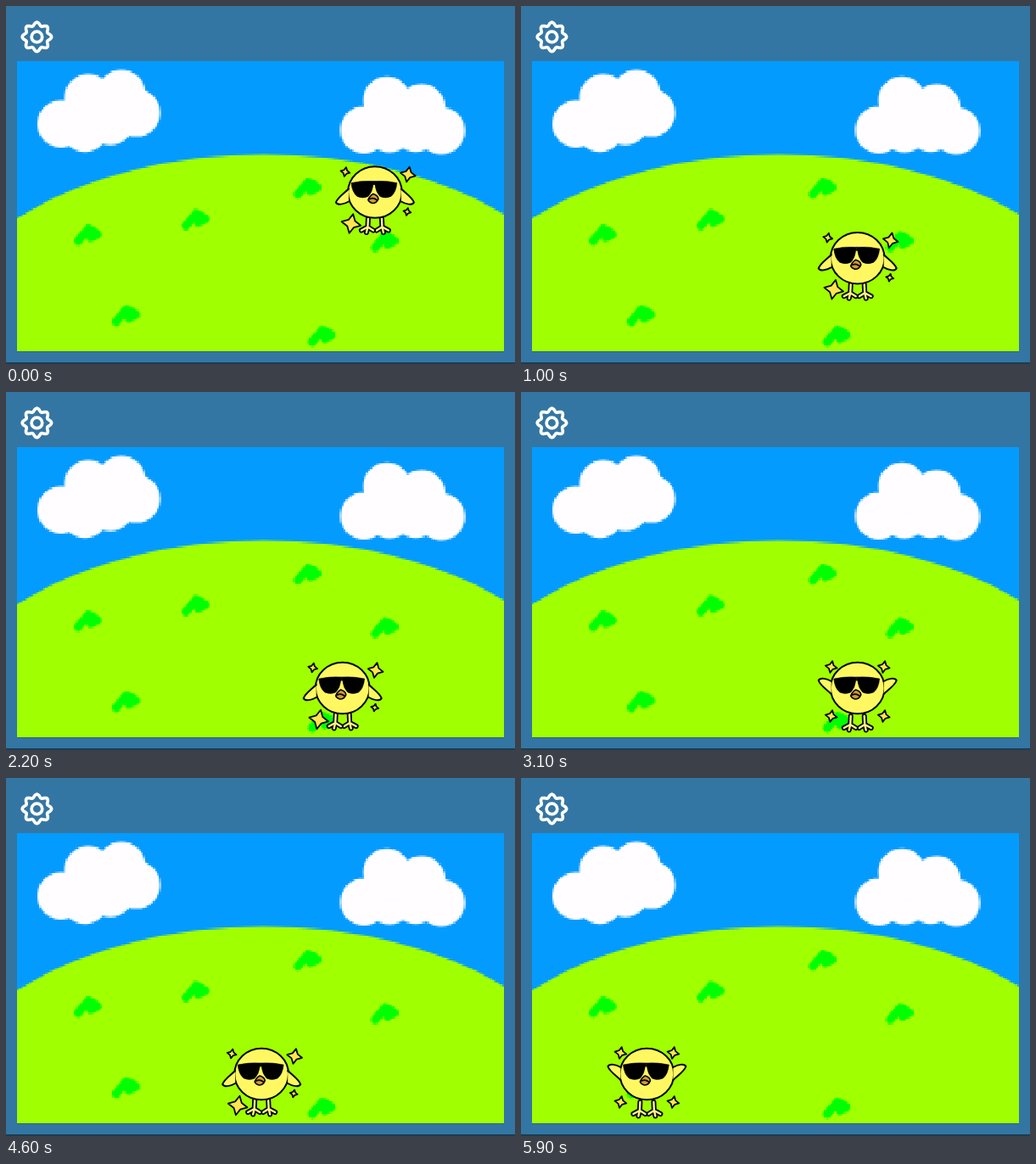
An HTML page with a canvas that plays this animation: 600 by 422 pixels, repeating every 6000 ms.

```html
<!DOCTYPE html>
<html>
<head>
<meta charset="utf-8">
<style>
html, body { margin: 0; height: 100%; overflow: hidden; background: #3476a3; }
canvas { display: block; }
</style>
</head>
<body>
<canvas id="stage" width="600" height="422"></canvas>
<script>
const ctx = document.getElementById('stage').getContext('2d');
const LOOP = 6000, FRAME = 100;
const HOME = { x: 396.7, y: 349 }, STEP = { x: 19.1, y: 25.9 };
const BODY = '#fff861', INK = '#050500';

// Time, then steps to the right of and above the home spot
const WALK = [[0, 2, 5], [600, 0, 0], [1400, 0, 4], [2200, 0, 0], [3800, 0, 0], [LOOP, -13.6, 0]];

// Right halves, mirrored for the left
const WING = new Path2D('M31-4C36 1 44 6 46 12C44 16 36 14 31 11');
const LENS = new Path2D('M0-13Q14-14 27-11Q26 0 20 5Q13 8 7 5Q2 0 1-9H0Z');
const LEG = new Path2D('M8 31L8.5 41L2 45M8.5 41L10 47.5M8.5 41L16 45');
const BEAK = new Path2D('M-2 2Q4 4 4 8Q2 13-3 13Q-7 12-8 9Q-6 4-2 2ZM-6 8Q-2 6 2 9');
const SPARKLES = [[-35, -24, 5.5], [39, -21, 9], [-28, 37, 11.5], [38, 23, 4.5]];

function drawCloud(g, lobes) {
  const cloud = new Path2D();
  for (const [x, y] of lobes) {
    cloud.moveTo(x + 28, y);
    cloud.arc(x, y, 28, 0, 2 * Math.PI);
  }
  g.fillStyle = '#fffdff';
  g.fill(cloud);
  g.beginPath();
  lobes.forEach(lobe => g.lineTo(...lobe));
  g.fill();
}

function drawTuft(g, x, y) {
  g.save();
  g.translate(x, y);
  g.stroke(new Path2D('M-12 8L0-6L3 4L11 0M0-6L6-4'));
  g.restore();
}

// Small offscreen picture, enlarged later for the blocky edges
function makeMeadow() {
  const canvas = document.createElement('canvas');
  canvas.width = 240;
  canvas.height = 144;
  const g = canvas.getContext('2d');
  g.scale(240 / 574, 144 / 343);
  g.translate(-13, -64.5);
  g.fillStyle = '#049bff';
  g.fillRect(0, 0, 600, 422);
  drawCloud(g, [[65, 139], [97, 108], [136, 103], [154, 126], [123, 136], [93, 144]]);
  drawCloud(g, [[422, 146], [449, 111], [490, 120], [513, 147], [483, 144], [452, 145]]);
  g.fillStyle = '#a0ff00';
  g.beginPath();
  g.ellipse(304, 415, 400, 240, 0, 0, 2 * Math.PI);
  g.fill();
  g.strokeStyle = '#00ff00';
  g.lineWidth = 10;
  g.lineCap = g.lineJoin = 'round';
  for (const [x, y] of [[97, 269], [224, 251], [356, 214], [447, 277], [142, 364], [373, 388]]) drawTuft(g, x, y);
  return canvas;
}

function drawGear() {
  ctx.beginPath();
  for (let i = 0; i < 160; i++) {
    const a = i / 160 * 2 * Math.PI;
    const r = 15.3 + 1.9 * Math.cos(8 * a);
    ctx.lineTo(36.4 + r * Math.cos(a), 36.4 + r * Math.sin(a));
  }
  ctx.closePath();
  ctx.moveTo(42.7, 36.4);
  ctx.arc(36.4, 36.4, 6.3, 0, 2 * Math.PI);
  ctx.strokeStyle = '#fff';
  ctx.lineWidth = 3.7;
  ctx.stroke();
}

function paint(path, fill, width = 2) {
  ctx.fillStyle = fill;
  ctx.fill(path);
  ctx.strokeStyle = INK;
  ctx.lineWidth = width;
  ctx.stroke(path);
}

function drawSparkle(x, y, r) {
  const star = new Path2D();
  for (let i = 0; i < 8; i++) {
    const a = .2 + i * Math.PI / 4;
    const d = i % 2 ? r * .48 : r;
    star.lineTo(x + d * Math.cos(a), y + d * Math.sin(a));
  }
  star.closePath();
  paint(star, '#ffe552', 1.8);
}

// Runs a drawing once as it is and once flipped around the given x
function mirrored(axis, drawHalf) {
  for (const side of [1, -1]) {
    ctx.save();
    ctx.translate(axis, 0);
    ctx.scale(side, 1);
    drawHalf();
    ctx.restore();
  }
}

function drawLeg() {
  ctx.strokeStyle = INK;
  ctx.lineWidth = 6;
  ctx.stroke(LEG);
  ctx.strokeStyle = '#fff38a';
  ctx.lineWidth = 2.4;
  ctx.stroke(LEG);
}

function drawWing(raised) {
  if (raised) {
    ctx.translate(0, 3);
    ctx.scale(1, -1);
  }
  paint(WING, BODY);
}

function drawChick(x, y, raised) {
  ctx.save();
  ctx.translate(x, y);
  ctx.save();
  ctx.translate(0, raised ? 2 : 0);
  mirrored(0, drawLeg);
  ctx.restore();
  const body = new Path2D();
  body.ellipse(0, 0, 31.8, 30.3, 0, 0, 2 * Math.PI);
  paint(body, BODY);
  mirrored(0, () => drawWing(raised));
  mirrored(-1, () => paint(LENS, '#000', .5));
  paint(BEAK, '#d29a35', 1.7);
  for (const [sx, sy, r] of SPARKLES) {
    if (raised) drawSparkle(31 * Math.sign(sx), 4 + 29 * Math.sign(sy), 7);
    else drawSparkle(sx, sy, r);
  }
  ctx.restore();
}

function stepsAt(t) {
  const i = WALK.findIndex(key => key[0] > t);
  const [t0, ...from] = WALK[i - 1], [t1, ...to] = WALK[i];
  const k = (t - t0) / (t1 - t0);
  return from.map((v, axis) => Math.round(v + (to[axis] - v) * k));
}

const meadow = makeMeadow();
ctx.lineCap = ctx.lineJoin = 'round';
ctx.imageSmoothingEnabled = false;

function draw() {
  const frame = Math.floor(performance.now() % LOOP / FRAME);
  const [right, up] = stepsAt(frame * FRAME);
  ctx.fillStyle = '#3476a3';
  ctx.fillRect(0, 0, 600, 422);
  ctx.fillStyle = '#1d3c52';
  ctx.fillRect(0, 420, 600, 2);
  ctx.drawImage(meadow, 13, 64.5, 574, 343);
  ctx.fillStyle = '#2a6285';
  ctx.fillRect(13, 407, 574, 1);
  drawGear();
  drawChick(HOME.x + right * STEP.x, HOME.y - up * STEP.y, frame % 2 === 1);
  requestAnimationFrame(draw);
}
draw();
</script>
</body>
</html>
```
